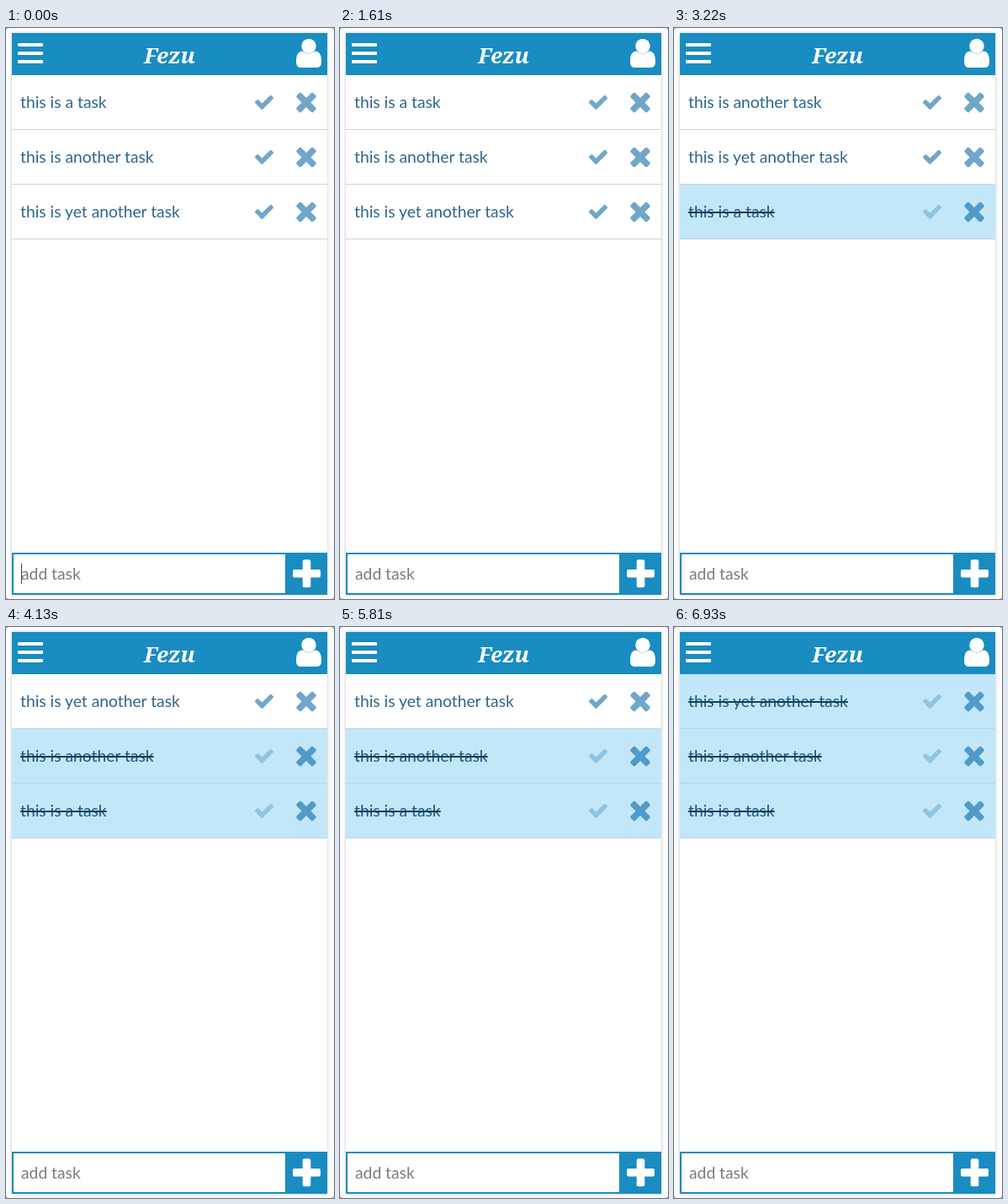
Write an HTML page that moves like this. It is 390x678 px and loops after 7000 ms.

```html
<!DOCTYPE html>
<html lang="en">
<head>
<meta charset="utf-8">
<title>Task list</title>
<style>
  html, body { margin: 0; width: 100%; height: 100%; overflow: hidden; background: #aaa; }
  #stage { position: relative; width: 390px; height: 678px; border-radius: 4px; overflow: hidden;
    background: #fcfcfc; font: 19.3px Lato, sans-serif; color: #2c668c; }
  #card, header, .row, .add, .plus, svg, #caret { position: absolute; box-sizing: border-box; }
  #card { left: 7px; top: 6px; width: 375px; height: 667px; background: #fff; box-shadow: 0 0 3px rgba(0, 0, 0, .25); }
  header { left: 0; top: 0; width: 375px; height: 50px; background: #198cc1; color: #fff;
    font: italic 900 26px/52px "Noto Serif", serif; text-align: center; }
  .row { left: 0; width: 375px; height: 65px; padding-left: 10px; line-height: 64px; border-bottom: 1px solid #d2d2d2; }
  .row svg { left: 0; top: 0; }
  .check, .cross { fill: #71a6ca; }
  .done { background: #c2e7f9; border-color: #b9d6e3; color: #215476; }
  .done span { text-decoration: line-through 2px #123f5d; }
  .done .check { fill: #8fc4e2; }
  .done .cross { fill: #529ac8; }
  .add { left: 0; top: 617px; width: 327px; height: 50px; padding-left: 9px; line-height: 46px;
    border: 2px solid #198cc1; color: #7b7b7b; }
  .plus { left: 325px; top: 617px; width: 50px; height: 50px; background: #198cc1; }
  #caret { left: 11px; top: 630px; width: 1px; height: 24px; background: #294a63; }
</style>
</head>
<body>
<div id="stage">
  <div id="card">
    <header>Fezu
      <svg style="left:0;top:0" width="375" height="50" fill="#fff">
        <path d="M8 12h28q1 0 1 1v2q0 1-1 1h-28q-1 0-1-1v-2q0-1 1-1zm0 10h28q1 0 1 1v2q0 1-1 1h-28q-1 0-1-1v-2q0-1 1-1zm0 10h28q1 0 1 1v2q0 1-1 1h-28q-1 0-1-1v-2q0-1 1-1z"/>
        <circle cx="353" cy="15.5" r="8.7"/>
        <path d="M345.5 21.5q7.5 5.8 15 0c5 0 7.5 4 7.5 12.500q0 7-5 7h-20q-5 0-5-7c0-8.500 2.500-12.500 7.500-12.500z"/>
      </svg>
    </header>
    <div id="rows"></div>
    <div class="add">add task</div>
    <svg class="plus" fill="#fff">
      <rect x="9" y="20" width="33" height="9.500" rx="2"/>
      <rect x="20.700" y="8.200" width="9.600" height="33" rx="2"/>
    </svg>
    <div id="caret"></div>
  </div>
</div>
<script>
const LOOP = 7000;
const TASKS = ['this is a task', 'this is another task', 'this is yet another task'];
const CLICKS = [1750, 4130, 5880];
// [start time, caret opacity]
const BLINK = [[0, 1], [70, .4], [140, 0], [490, .5], [560, 1], [980, .5], [1050, 0]];

const CHECK = 'M1671 566q0 40-28 68l-860 860q-28 28-68 28t-68-28l-498-498q-28-28-28-68t28-68l136-136q28-28 68-28t68 28l294 295 656-657q28-28 68-28t68 28l136 136q28 28 28 68z';
const CROSS_ARM = 'M-594-362q0-40 28-68l136-136q28-28 68-28t68 28l860 860q28 28 28 68t-28 68l-136 136q-28 28-68 28t-68-28l-860-860q-28-28-28-68z';

const ICONS = `<svg width="375" height="64">
  <path class="check" d="${CHECK}" transform="translate(300 32.3) scale(.0143) translate(-896 -928)"/>
  <g class="cross" transform="translate(350 32.5) scale(.0197)">
    <path d="${CROSS_ARM}"/><path d="${CROSS_ARM}" transform="scale(-1 1)"/>
  </g></svg>`;

const rows = document.getElementById('rows');
const caret = document.getElementById('caret');
let shown = -1;

function drawRows(doneCount) {
  const open = TASKS.slice(doneCount);
  const done = TASKS.slice(0, doneCount).reverse();
  rows.innerHTML = [...open, ...done].map((task, i) =>
    `<div class="row ${i >= open.length ? 'done' : ''}" style="top:${50 + 65 * i}px"><span>${task}</span>${ICONS}</div>`
  ).join('');
  shown = doneCount;
}

function render(now) {
  const t = now % LOOP;
  const doneCount = CLICKS.filter(click => t >= click).length;
  if (doneCount !== shown) drawRows(doneCount);
  caret.style.opacity = BLINK.filter(([start]) => t >= start).pop()[1];
}

const begin = performance.now();
function tick() {
  render(performance.now() - begin);
  requestAnimationFrame(tick);
}
tick();
</script>
</body>
</html>
```
